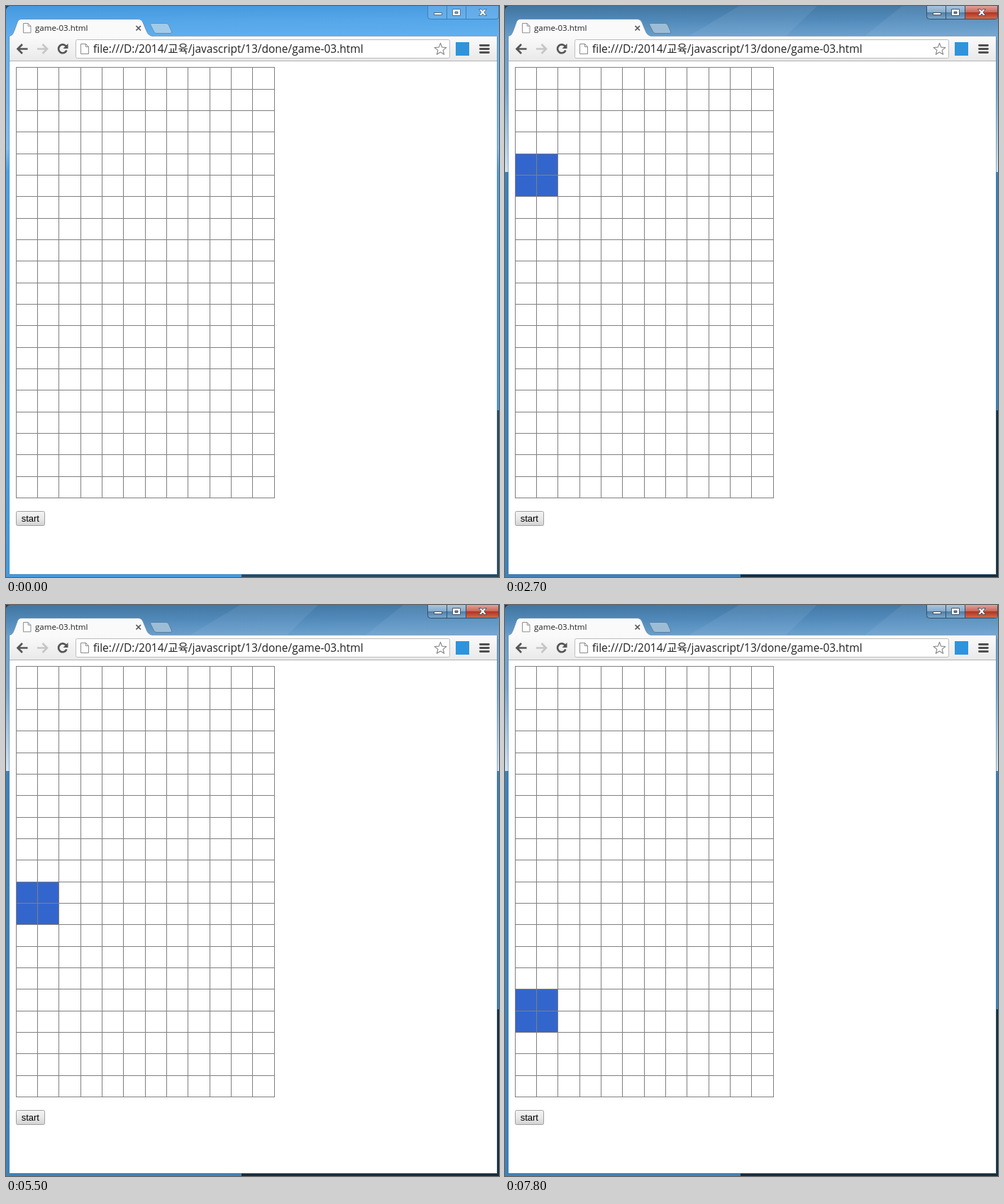
These frames come from a looping animation (695 by 805 pixels, 8000 ms). An HTML page:

```html
<!DOCTYPE html>
<html lang="ko">
<head>
<meta charset="utf-8">
<title>Falling block</title>
<style>
  html, body { margin: 0; width: 100%; height: 100%; overflow: hidden; background: #fff; }
  svg { display: block; width: 695px; height: 805px; }
  text { white-space: pre; }
  .ui { font-family: "Open Sans", "Noto Sans CJK KR", "Noto Sans CJK", sans-serif; }
  .label { font: 13px "Liberation Sans", Arial, sans-serif; }
  .crisp { shape-rendering: crispEdges; }
</style>
</head>
<body>
<svg viewBox="0 0 695 805">
  <defs>
    <linearGradient id="idleTop" x2=".12" y2="1">
      <stop offset="0" stop-color="#4698de"/><stop offset=".5" stop-color="#55a7e9"/><stop offset="1" stop-color="#62b0ef"/>
    </linearGradient>
    <linearGradient id="liveTop" x2=".12" y2="1">
      <stop offset="0" stop-color="#41759f"/><stop offset=".45" stop-color="#5089b9"/><stop offset="1" stop-color="#6ea3cf"/>
    </linearGradient>
    <linearGradient id="idleSide" x2="0" y2="1">
      <stop offset="0" stop-color="#5cabeb"/><stop offset=".25" stop-color="#80bff2"/><stop offset=".29" stop-color="#4ba2e7"/><stop offset="1" stop-color="#429be2"/>
    </linearGradient>
    <linearGradient id="liveSide" x2="0" y2="1">
      <stop offset="0" stop-color="#5f96c5"/><stop offset=".5" stop-color="#7dabd0"/><stop offset="1" stop-color="#d3e3ef"/>
    </linearGradient>
    <linearGradient id="bar" x2="0" y2="1">
      <stop offset="0" stop-color="#fbfbfb"/><stop offset="1" stop-color="#e9e9e9"/>
    </linearGradient>
    <linearGradient id="btnUp" x2="0" y2="1">
      <stop offset="0" stop-color="#f4f4f4"/><stop offset=".5" stop-color="#e9e9e9"/><stop offset="1" stop-color="#d2d2d2"/>
    </linearGradient>
    <linearGradient id="btnDown" x2="0" y2="1">
      <stop offset="0" stop-color="#d0d0d0"/><stop offset="1" stop-color="#e6e6e6"/>
    </linearGradient>
    <linearGradient id="glass" x2="0" y2="1">
      <stop offset="0" stop-color="#a9c5dd"/><stop offset=".48" stop-color="#86abca"/><stop offset=".5" stop-color="#4f7ea7"/><stop offset="1" stop-color="#7fa9cc"/>
    </linearGradient>
    <linearGradient id="red" x2="0" y2="1">
      <stop offset="0" stop-color="#dfa298"/><stop offset=".48" stop-color="#c9675a"/><stop offset=".5" stop-color="#b0321f"/><stop offset="1" stop-color="#cf6a4a"/>
    </linearGradient>
    <path id="caps" d="M594.5 0V14.5Q594.5 18.5 598.5 18.5H691Q694.5 18.5 694.5 15V0M621.5 0V18M648.5 0V18"/>
    <path id="tab" d="M4 42.5C9 42 10 39 12 34L16 23Q17.500 18.500 22 18.500H186Q191 18.500 193 23L198 35Q200.500 42 207 42.500Z"/>
    <path id="plus" d="M204.500 24.500H226Q228.500 24.500 229.500 27L233.500 36Q234.500 38.500 232 38.500H212Q209.500 38.500 208.500 36L203.500 26Z"/>
    <path id="sheet" d="M.5 .5H7.500L11.500 4.500V14.500H.5ZM7.500 .5V4.500H11.500"/>
    <g id="glyphs">
      <rect x="603.500" y="9.500" width="11" height="3"/>
      <path fill-rule="evenodd" d="M629.500 4.500H640.500V13.500H629.500ZM633 8V10.500H637V8Z"/>
      <path d="M666.500 4.500H670L672 6.700L674 4.500H677.500L674 8.800L677.500 13.500H674L672 11L670 13.500H666.500L670 8.800Z"/>
    </g>
  </defs>

  <!-- window frame without focus -->
  <rect width="695" height="805" fill="url(#idleSide)"/>
  <rect width="695" height="48" fill="url(#idleTop)"/>
  <path d="M692 570h3V805H692ZM332 801H695V805H332Z" fill="#29495a"/>
  <use href="#caps" fill="#7dbbed" fill-opacity=".45" stroke="#3d7fb8"/>
  <use href="#glyphs" fill="#fff" stroke="#56718a"/>
  <use href="#plus" fill="#a2cbea" stroke="#5f92b9"/>

  <!-- window frame with focus -->
  <g id="live" opacity="0">
    <rect width="695" height="805" fill="#3d82b9"/>
    <rect width="695" height="234" fill="url(#liveSide)"/>
    <rect width="695" height="48" fill="url(#liveTop)"/>
    <path d="M330 0H440L390 48H250ZM560 0H594V18H695V48H500Z" fill="#a7cae5" opacity=".13"/>
    <path d="M692 570h3V805H692ZM332 801H695V805H332Z" fill="#172c3b"/>
    <use href="#caps" fill="url(#glass)" stroke="#31506b"/>
    <path d="M649 0H694V15Q694 18 691 18H649Z" fill="url(#red)"/>
    <use href="#glyphs" fill="#fff" stroke="#4a5566"/>
    <use href="#plus" fill="#9dbdd7" stroke="#5b80a0"/>
  </g>
  <path d="M0 0H5Q1 1 0 5Z" fill="#26394a"/>

  <!-- page and toolbar -->
  <rect x="4" y="43" width="689" height="759" fill="#4a7ca5" opacity=".55"/>
  <rect x="5" y="43" width="687" height="758" fill="#fff"/>
  <rect x="5" y="42" width="687" height="36" fill="url(#bar)"/>
  <path class="crisp" d="M207 42.500H692" stroke="#8ba9c1"/>
  <path class="crisp" d="M5 77.500H692" stroke="#b3b3b3"/>
  <use href="#tab" fill="#fafafa"/>
  <path d="M4 42.500C9 42 10 39 12 34L16 23Q17.500 18.500 22 18.500H186Q191 18.500 193 23L198 35Q200.500 42 207 42.500" fill="none" stroke="#6f94b2"/>
  <use href="#sheet" transform="translate(24 24) scale(.95)" fill="#fff" stroke="#8b8b8b"/>
  <text class="ui" x="41" y="35" font-size="11.500" fill="#222">game-03.html</text>
  <path d="M183.500 28L190 34.500M190 28L183.500 34.500" stroke="#555" stroke-width="1.700"/>

  <g fill="none" stroke-width="2.700">
    <path d="M30.500 60.500H17M23 54L16.500 60.500L23 67" stroke="#555"/>
    <path d="M44 60.500H57.500M51.500 54L58 60.500L51.500 67" stroke="#c6c6c6"/>
    <path d="M84.800 57A5.900 5.900 0 1 0 85.400 62.500" stroke="#555"/>
  </g>
  <path d="M87.500 53V60H80.500Z" fill="#555"/>
  <rect x="98.500" y="47.500" width="527" height="26" rx="2" fill="#fff" stroke="#bdbdbd"/>
  <use href="#sheet" x="105" y="53" fill="#fff" stroke="#8b8b8b"/>
  <text class="ui" x="123" y="66" font-size="15.500" fill="#222">file:///D:/2014/교육/javascript/13/done/game-03.html</text>
  <path id="star" fill="#fff" stroke="#8a8a8a" stroke-width="1.200" stroke-linejoin="round"/>
  <rect x="634" y="51" width="19" height="19" fill="#2f94dc"/>
  <path d="M668.500 55.500H680.500M668.500 60.500H680.500M668.500 65.500H680.500" stroke="#505050" stroke-width="2.800" stroke-linecap="round"/>

  <!-- game board -->
  <rect id="block" class="crisp" fill="#3366cc" visibility="hidden"/>
  <path id="grid" class="crisp" fill="none" stroke="#808080"/>

  <rect id="button" x="14.500" y="712.500" width="40" height="20" rx="2" fill="url(#btnUp)" stroke="#a0a0a0"/>
  <text class="label" x="21.700" y="727" fill="#000">start</text>
</svg>
<script>
  const LOOP = 8000, COLS = 12, ROWS = 20, CELL = 91 / 3;
  const $ = id => document.getElementById(id);
  const set = (el, attrs) => {
    for (const key in attrs) el.setAttribute(key, attrs[key]);
  };
  const colX = i => Math.floor(14.1 + CELL * i);
  const rowY = i => Math.floor(86.9 + CELL * i);

  let lines = '';
  for (let i = 0; i <= COLS; i++) lines += `M${colX(i) + .5} ${rowY(0)}V${rowY(ROWS) + 1}`;
  for (let i = 0; i <= ROWS; i++) lines += `M${colX(0)} ${rowY(i) + .5}H${colX(COLS) + 1}`;
  set($('grid'), { d: lines });

  const points = Array.from({ length: 10 }, (_, i) => {
    const r = i % 2 ? 3.8 : 8.8, a = Math.PI * (i / 5 - .5);
    return `${(612.5 + r * Math.cos(a)).toFixed(2)} ${(61.2 + r * Math.sin(a)).toFixed(2)}`;
  });
  set($('star'), { d: `M${points.join('L')}Z` });

  function draw(t) {
    set($('live'), { opacity: t < 600 ? 0 : t < 700 ? .5 : 1 });

    const pressed = t >= 700 && t < 900;
    set($('button'), {
      fill: pressed ? 'url(#btnDown)' : 'url(#btnUp)',
      stroke: pressed ? '#808080' : '#a0a0a0'
    });

    // One row every 4.58 ticks of 100 ms
    const ticks = Math.floor(t / 100) - 13;
    const row = 1 + Math.floor(Math.max(0, ticks) / 4.58);
    set($('block'), {
      visibility: ticks < 0 ? 'hidden' : 'visible',
      x: colX(0), y: rowY(row),
      width: colX(2) - colX(0), height: rowY(row + 2) - rowY(row)
    });
  }

  const start = performance.now();
  function frame() {
    draw((performance.now() - start) % LOOP);
    requestAnimationFrame(frame);
  }
  draw(0);
  requestAnimationFrame(frame);
</script>
</body>
</html>
```
